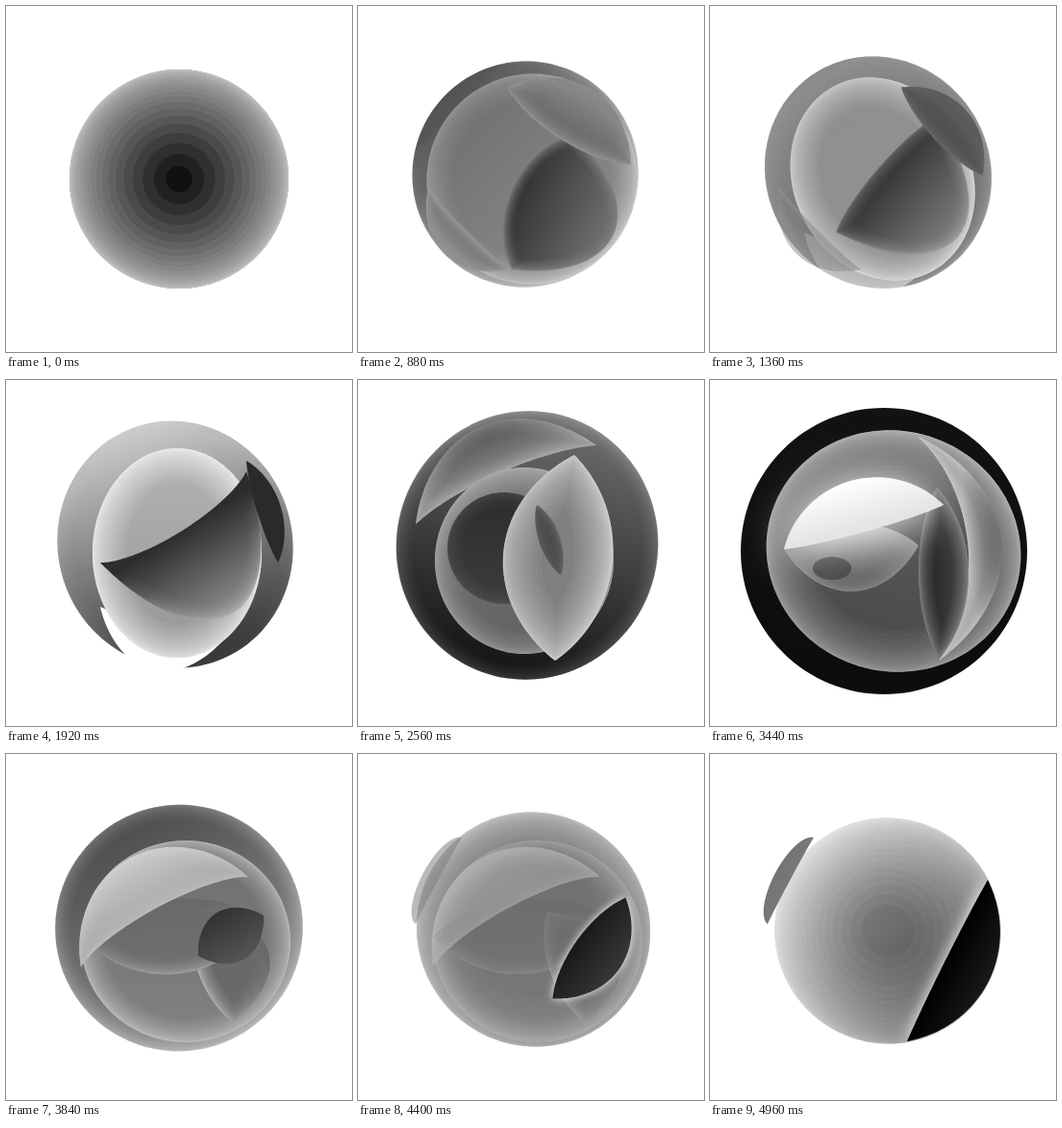
These frames come from a looping animation (360x360 px, 5.04 s). An HTML page with a canvas:

```html
<!DOCTYPE html>
<html>
<head>
<meta charset="utf-8">
<style>
  html, body { margin: 0; width: 100%; height: 100%; overflow: hidden; background: #fff; }
  canvas { display: block; }
</style>
</head>
<body>
<canvas id="stage" width="360" height="360"></canvas>
<script>
const ctx = document.getElementById('stage').getContext('2d');
const LOOP = 5040, STEP = 80, RIM_STEPS = 24;

// A sheet spans a chord between two points and has two edges that bulge from it
// (a, b: positive is to the left of the chord). Its tone and rim light run from edge a to edge b.
function lens(x1, y1, x2, y2, a, b, tone, { rim = [0, 0], width = 16, round = 0.4, glow = 0 } = {}) {
  return [1, x1, y1, x2, y2, a, b, ...tone, ...rim, width, round, glow];
}

function disc(cx, cy, rx, ry, tone, { tilt = 0, ...look } = {}) {
  const dx = rx * Math.cos(tilt), dy = rx * Math.sin(tilt);
  return lens(cx - dx, cy - dy, cx + dx, cy + dy, ry, -ry, tone, { round: 1, ...look });
}

const ORDER = ['body', 'gap', 'cap', 'ball', 'flap', 'bowl', 'hole', 'shade', 'light', 'slit', 'tab'];

const poses = [
  {
    t: 0,
    body: disc(180, 180, 114, 114, [0, 0], { rim: [1.7, 1.7], width: 114 })
  },
  {
    t: 880,
    body: disc(174, 175, 118, 117, [82, 150], { tilt: -0.8, rim: [0, 1], width: 26 }),
    ball: disc(181, 180, 110, 109, [112, 140], { tilt: -0.8, rim: [0.4, 1.1], width: 26 }),
    flap: lens(73, 190, 157, 274, -3, -36, [105, 150], { rim: [0.6, 0] }),
    shade: lens(160, 274, 222, 134, 34, -82, [46, 115], { rim: [0.8, 0.2], width: 12, round: 0.5 }),
    slit: lens(155, 85, 284, 165, 45, -16, [140, 98], { rim: [0, 0.6] })
  },
  {
    t: 1920,
    body: disc(176, 171, 122, 129, [205, 48], { tilt: -0.3, rim: [0.2, 0.1] }),
    gap: lens(98, 236, 230, 266, -5, -52, [255, 255]),
    ball: disc(178, 180, 88, 109, [180, 150], { rim: [1.7, 1.7], width: 34 }),
    shade: lens(98, 190, 250, 95, -17, -118, [45, 145], { rim: [0, 0.6], round: 0.55 }),
    slit: lens(250, 84, 283, 190, 20, -5, [42, 42])
  },
  {
    t: 2560,
    body: disc(176, 172, 136, 140, [110, 18], { tilt: 0.25, rim: [0.4, 0.3] }),
    cap: lens(60, 150, 248, 68, 66, 14, [80, 135], { rim: [0.5, 0.5] }),
    ball: disc(173, 188, 93, 97, [130, 95], { rim: [0.6, 0.6], width: 24 }),
    shade: disc(152, 175, 59, 58, [45, 60], { rim: [0.2, 0.2] }),
    light: lens(205, 292, 225, 78, 64, -50, [125, 130], { rim: [1, 1.3], width: 40 }),
    slit: lens(186, 130, 211, 203, 12, -10, [62, 75], { rim: [0.4, 0.1] })
  },
  {
    t: 3440,
    body: disc(181, 178, 149, 149, [18, 12]),
    ball: disc(191, 178, 133, 125, [95, 72], { tilt: 0.3, rim: [1, 0.8], width: 44 }),
    flap: lens(238, 292, 215, 58, -42, -77, [160, 85], { rim: [0.7, 0.3] }),
    bowl: lens(77, 176, 217, 172, 25, -46, [170, 85], { rim: [0, 0.5] }),
    hole: disc(127, 196, 20, 12, [70, 75]),
    shade: lens(238, 290, 236, 112, 20, -32, [32, 70], { rim: [0.8, 0.6] }),
    light: lens(77, 176, 243, 130, 50, -5, [255, 225], { rim: [0.5, 0.5], round: 0.5, glow: 44 })
  },
  {
    t: 3840,
    body: disc(180, 181, 129, 128, [75, 150], { tilt: -0.5, rim: [0.4, 0.7] }),
    ball: disc(187, 195, 109, 105, [110, 130], { rim: [0.9, 0.9], width: 24 }),
    flap: lens(238, 280, 197, 165, 18, -58, [105, 105], { rim: [1, 0] }),
    bowl: lens(78, 190, 268, 172, 30, -48, [105, 112], { rim: [0, 0.6] }),
    shade: lens(200, 210, 268, 168, 28, -28, [50, 85]),
    light: lens(78, 222, 252, 128, 76, 17, [200, 170], { rim: [0.3, 0.4], round: 0.6 })
  },
  {
    t: 4960,
    body: disc(185, 184, 117, 118, [150, 70], { tilt: -0.9, rim: [1.8, 0.7], width: 90 }),
    shade: lens(205, 299, 289, 131, 2, -48, [0, 25], { glow: 16 }),
    tab: lens(60, 177, 108, 87, 18, 1, [115, 120], { round: 0.9 })
  }
];

const hidden = sheet => [0, ...sheet.slice(1)];

function blend(a, b, k) {
  const from = a || hidden(b), to = b || hidden(a);
  return from.map((v, i) => v + (to[i] - v) * k);
}

function draw([alpha, x1, y1, x2, y2, a, b, toneA, toneB, rimA, rimB, width, round, glow]) {
  const dx = x2 - x1, dy = y2 - y1, length = Math.hypot(dx, dy);
  const point = (u, bulge) => {
    const along = u + ((1 - Math.cos(Math.PI * u)) / 2 - u) * round;
    const out = bulge * Math.sin(Math.PI * u) / length;
    return [x1 + dx * along + dy * out, y1 + dy * along - dx * out];
  };
  const across = (from, to) => {
    const g = ctx.createLinearGradient(...point(0.5, a), ...point(0.5, b));
    g.addColorStop(0, from);
    g.addColorStop(1, to);
    return g;
  };
  const gray = v => `rgb(${v},${v},${v})`;
  const white = depth => `rgba(255,255,255,${1 - Math.exp(-depth / RIM_STEPS)})`;

  const path = new Path2D();
  for (let u = 0; u <= 1; u += 1 / 64) path.lineTo(...point(u, a));
  for (let u = 1; u >= 0; u -= 1 / 64) path.lineTo(...point(u, b));
  path.closePath();

  ctx.save();
  ctx.globalAlpha = alpha;
  ctx.fillStyle = across(gray(toneA), gray(toneB));
  ctx.shadowColor = '#fff';
  ctx.shadowBlur = glow;
  ctx.fill(path);
  ctx.shadowBlur = 0;
  // Nested strokes pile up towards the edge, like a thin shell seen side-on.
  ctx.clip(path);
  ctx.strokeStyle = across(white(rimA), white(rimB));
  for (let i = 1; i <= RIM_STEPS; i++) {
    ctx.lineWidth = 2 * width * (i / RIM_STEPS) ** 3;
    ctx.stroke(path);
  }
  ctx.restore();
}

function frame(now) {
  const t = Math.floor(now % LOOP / STEP) * STEP;
  const next = poses.findIndex(p => p.t > t);
  const i = next < 0 ? poses.length - 1 : next;
  const a = poses[i - 1], b = poses[i], k = (t - a.t) / (b.t - a.t);
  ctx.fillStyle = '#fff';
  ctx.fillRect(0, 0, 360, 360);
  ctx.lineJoin = 'round';
  for (const name of ORDER) {
    if (a[name] || b[name]) draw(blend(a[name], b[name], k));
  }
  requestAnimationFrame(() => frame(performance.now() - start));
}

const start = performance.now();
frame(0);
</script>
</body>
</html>
```
